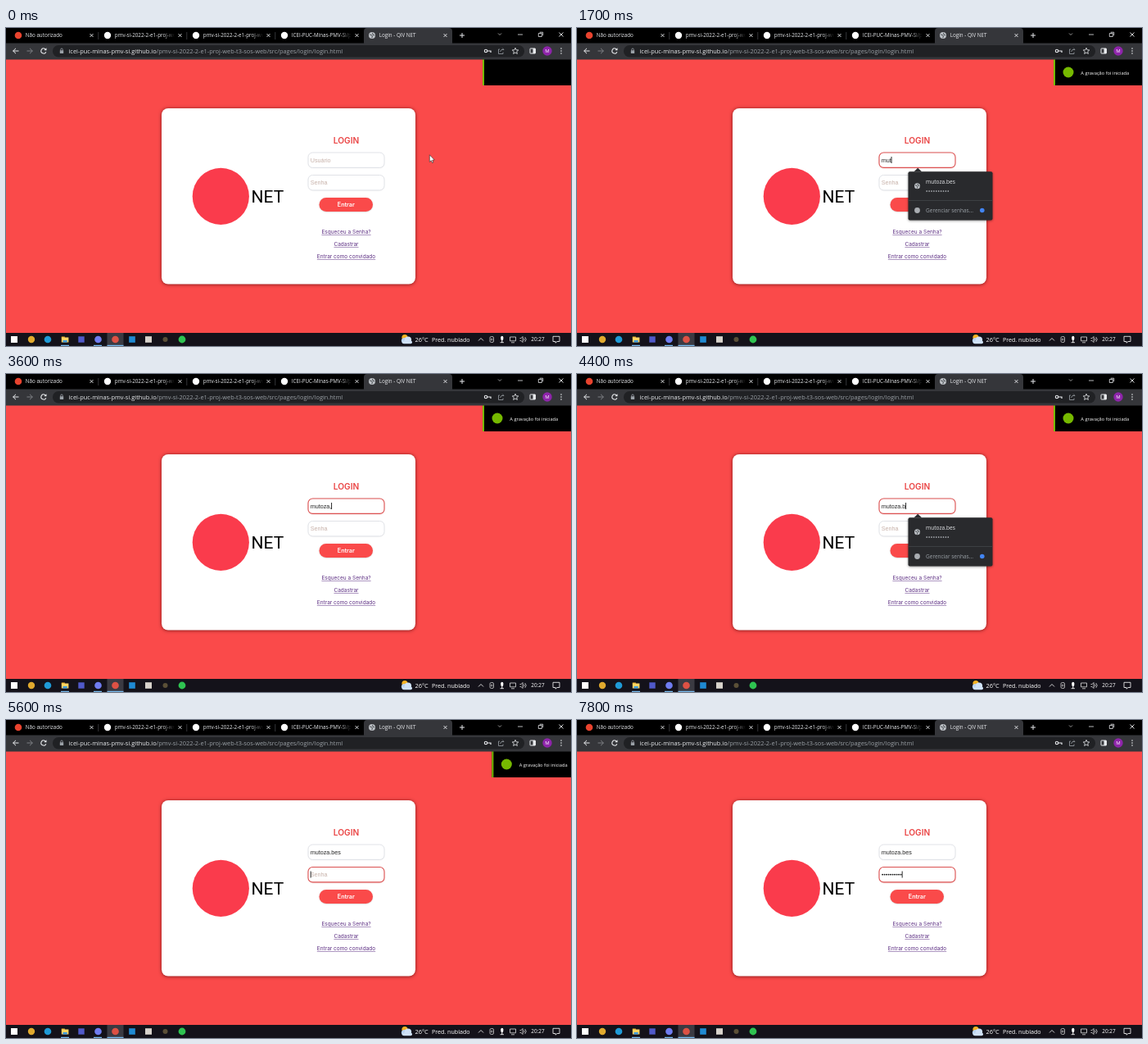
Write an HTML page with a canvas that moves like this. It is 690x388 px and loops after 8 s.

```html
<!DOCTYPE html>
<html lang="pt-BR">
<head>
<meta charset="utf-8">
<title>Login</title>
<style>
html, body { margin: 0; width: 100%; height: 100%; overflow: hidden; background: #fa4a4a; }
canvas { display: block; width: 690px; height: 388px; }
</style>
</head>
<body>
<canvas id="stage"></canvas>
<script>
const W = 690, H = 388, LOOP = 8000, TICK = 100;
const canvas = document.getElementById('stage');
const ctx = canvas.getContext('2d');
const dpr = window.devicePixelRatio || 1;
canvas.width = W * dpr;
canvas.height = H * dpr;

const UI = '"Open Sans", sans-serif';
const INTER = 'Inter, sans-serif';
const ARIAL = '"Liberation Sans", Arial, sans-serif';
const RED = '#fa4a4a', WHITE = '#fff', PALE = '#e8eaed', GREY = '#9aa0a6';
const USER = 'mutoza.bes';

// [time, letters typed, trailing mistake]
const USER_KEYS = [
  [500, 0], [1300, 1], [1400, 2], [1700, 3], [2000, 4], [2100, 5], [2300, 6],
  [2500, 6, ','], [3100, 6], [3600, 6, ','], [4100, 6], [4200, 7],
  [4400, 8], [4700, 9], [4900, 10]
];
const PASS_KEYS = [
  [5200, 0], [5800, 1], [6100, 2], [6400, 3], [6500, 4], [6700, 5], [6800, 6],
  [7000, 7], [7200, 8], [7500, 9], [7800, 10]
];
// [time, opacity]
const POPUP = [
  [400, 0], [500, 0.3], [600, 0.8], [700, 1], [2400, 1], [2500, 0.75], [2600, 0.3], [2700, 0],
  [3000, 0], [3100, 1], [3500, 1], [3600, 0], [4000, 0], [4100, 0.7], [4200, 1],
  [5100, 1], [5200, 0.75], [5300, 0.3], [5400, 0]
];

const clamp = v => Math.max(0, Math.min(1, v));
const smooth = v => v * v * (3 - 2 * v);
const progress = (t, from, to) => clamp((t - from) / (to - from));
const latest = (keys, t) => keys.filter(k => k[0] <= t).pop();

function ramp(keys, t) {
  const next = keys.findIndex(k => k[0] > t);
  if (next < 0) return keys[keys.length - 1][1];
  if (next === 0) return keys[0][1];
  const [a, b] = [keys[next - 1], keys[next]];
  return a[1] + (b[1] - a[1]) * progress(t, a[0], b[0]);
}

function text(str, x, y, size, color, font = UI, weight = 400, align = 'left') {
  ctx.font = `${weight} ${size}px ${font}`;
  ctx.textAlign = align;
  ctx.fillStyle = color;
  ctx.fillText(str, x, y);
  return ctx.measureText(str).width;
}

function box(x, y, w, h, fill, r = 0, stroke, lineWidth = 1) {
  ctx.beginPath();
  ctx.roundRect(x, y, w, h, r);
  if (fill) { ctx.fillStyle = fill; ctx.fill(); }
  if (stroke) { ctx.strokeStyle = stroke; ctx.lineWidth = lineWidth; ctx.stroke(); }
}

function dot(x, y, r, fill, stroke, lineWidth = 1) {
  ctx.beginPath();
  ctx.arc(x, y, r, 0, Math.PI * 2);
  if (fill) { ctx.fillStyle = fill; ctx.fill(); }
  if (stroke) { ctx.strokeStyle = stroke; ctx.lineWidth = lineWidth; ctx.stroke(); }
}

function path(points, color, lineWidth = 1, fill = false) {
  ctx.beginPath();
  points.forEach(([x, y]) => ctx.lineTo(x, y));
  if (fill) {
    ctx.closePath();
    ctx.fillStyle = color;
    ctx.fill();
  } else {
    ctx.strokeStyle = color;
    ctx.lineWidth = lineWidth;
    ctx.stroke();
  }
}

function shadowed(color, blur, dy, draw) {
  ctx.save();
  ctx.shadowColor = color;
  ctx.shadowBlur = blur * dpr;
  ctx.shadowOffsetY = dy * dpr;
  draw();
  ctx.restore();
}

function cross(x, y, s, color) {
  path([[x - s, y - s], [x + s, y + s]], color, 0.9);
  path([[x - s, y + s], [x + s, y - s]], color, 0.9);
}

function globe(x, y, r) {
  dot(x, y, r, '#bdc1c6');
  path([[x - r * 0.7, y - 1], [x - 0.5, y - 0.4], [x + 0.4, y + 1], [x - 0.2, y + r * 0.8]], '#3c4043', 0.9);
  path([[x + 0.6, y - r * 0.8], [x + 1, y - 0.8], [x + r * 0.8, y]], '#3c4043', 0.9);
}

function drawTabs() {
  box(0, 0, W, 19, '#000');
  box(437, 0, 108, 22, '#35363a', 4);
  const titles = [
    [15, 'Não autorizado'], [124, 'pmv-si-2022-2-e1-proj-web'],
    [232, 'pmv-si-2022-2-e1-proj-web'], [340, 'ICEI-PUC-Minas-PMV-SI/pmv'],
    [447, 'Login - QIV NET']
  ];
  titles.forEach(([x, title], i) => {
    if (i === 0) dot(x, 9, 4.3, '#e8432e');
    else if (i === 4) globe(x, 9, 4);
    else dot(x, 9, 4.2, WHITE);
    ctx.save();
    ctx.beginPath();
    ctx.rect(x, 0, 82, 18);
    ctx.clip();
    const fade = ctx.createLinearGradient(x + 68, 0, x + 82, 0);
    fade.addColorStop(0, PALE);
    fade.addColorStop(1, 'rgba(232,234,237,0)');
    text(title, x + 8.8, 11.4, 6.25, fade);
    ctx.restore();
    cross(104.5 + i * 108, 9, 2, PALE);
    if (i < 3) box(112.5 + i * 108, 5, 0.7, 9, '#4a4c50');
  });
  path([[554, 9], [560, 9]], PALE);
  path([[557, 6], [557, 12]], PALE);
  path([[601, 6.5], [603, 8.5], [605, 6.5]], '#aaa', 0.9);
  path([[625, 8], [631, 8]], PALE, 0.8);
  box(650.3, 6.5, 4, 4, null, 0, PALE, 0.8);
  path([[651.7, 5.2], [655.7, 5.2], [655.7, 9.2]], PALE, 0.8);
  cross(678, 8, 2.5, PALE);
}

function drawToolbar() {
  box(0, 18.5, W, 20, '#35363a');
  box(57, 21, 576, 14.5, '#202124', 7);
  path([[15.5, 28], [8.5, 28]], PALE);
  path([[12, 24.8], [8.7, 28], [12, 31.2]], PALE);
  path([[25.5, 28], [32.5, 28]], '#7c7f83');
  path([[29, 24.8], [32.3, 28], [29, 31.2]], '#7c7f83');
  ctx.beginPath();
  ctx.arc(46, 28, 3.1, 0.4, 5.5);
  ctx.strokeStyle = PALE;
  ctx.lineWidth = 1.1;
  ctx.stroke();
  path([[46.5, 27.2], [49.5, 27.2], [49.5, 24.2]], PALE, 1, true);
  box(65.8, 27.3, 4.4, 3.8, GREY, 0.5);
  box(66.7, 25, 2.6, 4, null, 1.3, GREY, 0.8);
  const host = text('icei-puc-minas-pmv-si.github.io', 76.5, 30.7, 7.38, PALE);
  text('/pmv-si-2022-2-e1-proj-web-t3-sos-web/src/pages/login/login.html', 76.5 + host, 30.7, 7.4, GREY);

  dot(586, 28, 1.7, null, PALE, 1.1);
  path([[588, 28], [592, 28], [592, 30]], PALE, 1.2);
  path([[603, 26], [601.5, 26], [601.5, 31.5], [607, 31.5], [607, 29.5]], GREY, 0.8);
  path([[603.5, 29], [605, 26.5], [608, 26.5], [606.3, 24.6]], GREY, 0.8);
  const star = Array.from({ length: 11 }, (_, i) => {
    const a = -Math.PI / 2 + i * Math.PI / 5, r = i % 2 ? 1.8 : 4;
    return [622 + r * Math.cos(a), 28.2 + r * Math.sin(a)];
  });
  path(star, PALE, 0.8);
  box(640, 25, 6.5, 6, null, 0.5, PALE, 1);
  box(643.5, 25, 3, 6, PALE);
  dot(661, 28, 5.7, '#8e24aa');
  text('M', 661, 30.3, 6, WHITE, UI, 400, 'center');
  [25, 28, 31].forEach(y => dot(678, y, 0.8, PALE));
}

function drawTaskbar() {
  box(0, 372, W, 16, '#14121a');
  box(123.5, 372, 20, 16, '#3b3a42');
  box(6, 376, 8, 8, WHITE);
  dot(31, 380, 4.2, '#e0a92e');
  dot(51, 380, 4.3, '#1f9ad6');
  box(67.8, 376.5, 4, 2, '#e8a825');
  box(67.8, 377.5, 8.6, 6, '#fcd462');
  box(69.5, 381, 5.2, 2.5, '#3a9be0');
  box(88.3, 376.3, 7.4, 7.4, '#5059c9');
  dot(112.5, 380, 4.3, '#6f7cf0');
  dot(133.5, 380, 4.3, '#dd5144');
  box(150.2, 376.2, 7.6, 7.6, '#1f8ad2');
  box(170, 376.2, 8, 7.6, '#d8d3cc');
  dot(194.5, 380, 3, '#5b5037');
  dot(215, 380, 4.4, '#2fc351');
  [[67, 10], [107, 10], [123.5, 20]].forEach(([x, w]) => box(x, 386.8, w, 1.2, '#76b9ed'));

  dot(487, 377.5, 3.6, '#f5b324');
  dot(486.5, 381.5, 3.6, '#b9d4f2');
  dot(491, 380.5, 4.1, '#cfe1f7');
  box(484, 381.5, 12, 3.7, '#cfe1f7', 1.8);
  text('26°C', 499.5, 382.8, 7.4, WHITE);
  text('Pred. nublado', 520, 382.8, 7.1, WHITE);
  path([[577, 381.5], [580, 378.5], [583, 381.5]], WHITE, 0.8);
  box(591, 376.5, 4.5, 7, null, 1.5, '#ccc', 0.8);
  dot(593.2, 380, 1, null, '#ccc', 0.7);
  box(604.3, 375.8, 3, 5.2, WHITE, 1.5);
  path([[605.8, 381], [605.8, 384]], WHITE);
  path([[603.5, 383.7], [608, 383.7]], WHITE, 0.8);
  box(615.5, 377, 7, 4.8, null, 0, '#ddd', 0.8);
  path([[617, 383.8], [621, 383.8]], '#ddd', 0.8);
  path([[627.5, 378.6], [629, 378.6], [631, 376.5], [631, 383.5], [629, 381.5], [627.5, 381.5]], '#ddd', 0.8);
  [2, 4].forEach(r => {
    ctx.beginPath();
    ctx.arc(631, 380, r, -0.8, 0.8);
    ctx.stroke();
  });
  text('20:27', 641.3, 382.4, 6.4, WHITE);
  path([[668, 376.3], [676, 376.3], [676, 382.5], [673, 382.5], [671, 384.2], [671, 382.5], [668, 382.5], [668, 376.3]], WHITE, 0.8);
}

function drawField(y, focused) {
  const [glow, blur, border, lineWidth] = focused
    ? ['rgba(200,60,60,.3)', 2, '#dc5252', 1.1]
    : ['rgba(0,0,0,.08)', 1.5, '#dadce2', 0.8];
  shadowed(glow, blur, 0.5, () => box(369, y, 93, 18.4, WHITE, 5.5));
  box(369, y, 93, 18.4, null, 5.5, border, lineWidth);
}

function drawLink(label, y) {
  const w = text(label, 415.5, y, 6.5, '#5d2f83', INTER, 400, 'center');
  box(415.5 - w / 2, y + 1, w, 0.5, '#5d2f83');
}

function drawCaret(x, y, since, t) {
  if (Math.floor((t - since) / 500) % 2 === 0) box(x, y, 0.9, 8, '#111');
}

function drawUserField(t) {
  const focused = t >= 500 && t < 5200;
  drawField(152, focused);
  const [since, count, slip = ''] = latest(USER_KEYS, t) || [0, 0];
  const value = USER.slice(0, count) + slip;
  let width = 0;
  if (value) width = text(value, 371.8, 163.6, 7.2, '#222', ARIAL);
  else text('Usuário', 371.8, 163.6, 7.2, '#c6b0a8', ARIAL);
  if (focused) drawCaret(371.6 + width, 157, since, t);
}

function drawPassField(t) {
  drawField(179.5, t >= 5200);
  const key = latest(PASS_KEYS, t);
  const count = key ? key[1] : 0;
  if (!count) text('Senha', 371.8, 191, 7.2, '#c6b0a8', ARIAL);
  for (let i = 0; i < count; i++) dot(373.1 + i * 2.5, 188.6, 0.95, '#111');
  if (key) drawCaret(371.7 + count * 2.5, 184.4, key[0], t);
}

function drawPage(t) {
  box(0, 38, W, 334, RED);
  shadowed('rgba(70,0,0,.7)', 4.5, 0.5, () => box(190, 98, 310, 214.5, WHITE, 8));
  dot(262.3, 205.4, 34.6, '#fa3b4c');
  text('NET', 299.6, 213.3, 21, '#000', 'Roboto, sans-serif');
  text('LOGIN', 415.5, 141.4, 10.2, '#ea4545', INTER, 600, 'center');
  drawUserField(t);
  drawPassField(t);
  shadowed('rgba(0,0,0,.2)', 1.5, 0.5, () => box(382.5, 207, 65.5, 17, RED, 8.5));
  text('Entrar', 415.3, 218.1, 7.2, WHITE, INTER, 600, 'center');
  drawLink('Esqueceu a Senha?', 251);
  drawLink('Cadastrar', 266.2);
  drawLink('Entrar como convidado', 281.3);
}

function drawAccount(name, stars, y) {
  globe(415.5, y + 5.8, 3.5);
  text(name, 426, y + 3, 6.6, PALE, UI, 500);
  for (let i = 0; i < stars; i++) dot(427.2 + i * 2.9, y + 12, 0.85, '#bdc1c6');
}

function drawPopup(t) {
  const alpha = ramp(POPUP, t);
  if (!alpha) return;
  const full = t < 1300;
  const bottom = full ? 266.5 : 234.5;
  ctx.save();
  ctx.globalAlpha = alpha;
  // The shadow weakens faster than the panel, so it does not darken a fading one.
  const shade = 0.45 * alpha ** 4;
  shadowed(`rgba(0,0,0,${shade})`, 3, 0.8, () => box(404.5, 175.3, 103, bottom - 175.3, '#292a2d', 2));
  path([[411.5, 175.3], [416.2, 170.8], [421, 175.3]], '#292a2d', 1, true);
  drawAccount(USER, 10, 187);
  if (full) drawAccount('chefe', 6, 218.3);
  const foot = bottom - 12;
  box(404.5, foot - 12.3, 103, 0.7, '#45474b');
  dot(415.5, foot, 3.4, '#a9adb2');
  text('Gerenciar senhas...', 426, foot + 2.5, 6.5, GREY);
  dot(494.8, foot, 2.8, '#4285f4');
  ctx.restore();
}

function drawToast(t) {
  const out = progress(t, 5500, 6000);
  if (out === 1) return;
  ctx.save();
  ctx.translate(109 * smooth(out), 0);
  box(582, 38, 108, 32, '#000');
  box(582, 38, 2, 32, '#76b900');
  ctx.globalAlpha = progress(t, 0, 500);
  dot(600, 54, 6.5, '#76b900');
  text('A gravação foi iniciada', 615.3, 56.5, 5.7, WHITE);
  ctx.restore();
}

function drawPointer(t) {
  const p = smooth(progress(t, 0, 450));
  const x = 517.3 - 92 * p, y = 154.8 + 5 * p;
  if (x < 462) return;
  const shape = [[0, 0], [0, 8.6], [2, 6.9], [3.3, 9.8], [4.6, 9.2], [3.4, 6.4], [6, 6.2]]
    .map(([dx, dy]) => [x + dx, y + dy]);
  path(shape, WHITE, 1, true);
  path([...shape, shape[0]], '#222', 0.6);
}

function frame(now) {
  const t = Math.floor((((now - start) % LOOP) + 2) / TICK) * TICK % LOOP;
  ctx.setTransform(dpr, 0, 0, dpr, 0, 0);
  drawPage(t);
  drawPopup(t);
  drawToast(t);
  drawTabs();
  drawToolbar();
  drawTaskbar();
  drawPointer(t);
  requestAnimationFrame(frame);
}

const start = performance.now();
frame(start);
</script>
</body>
</html>
```
